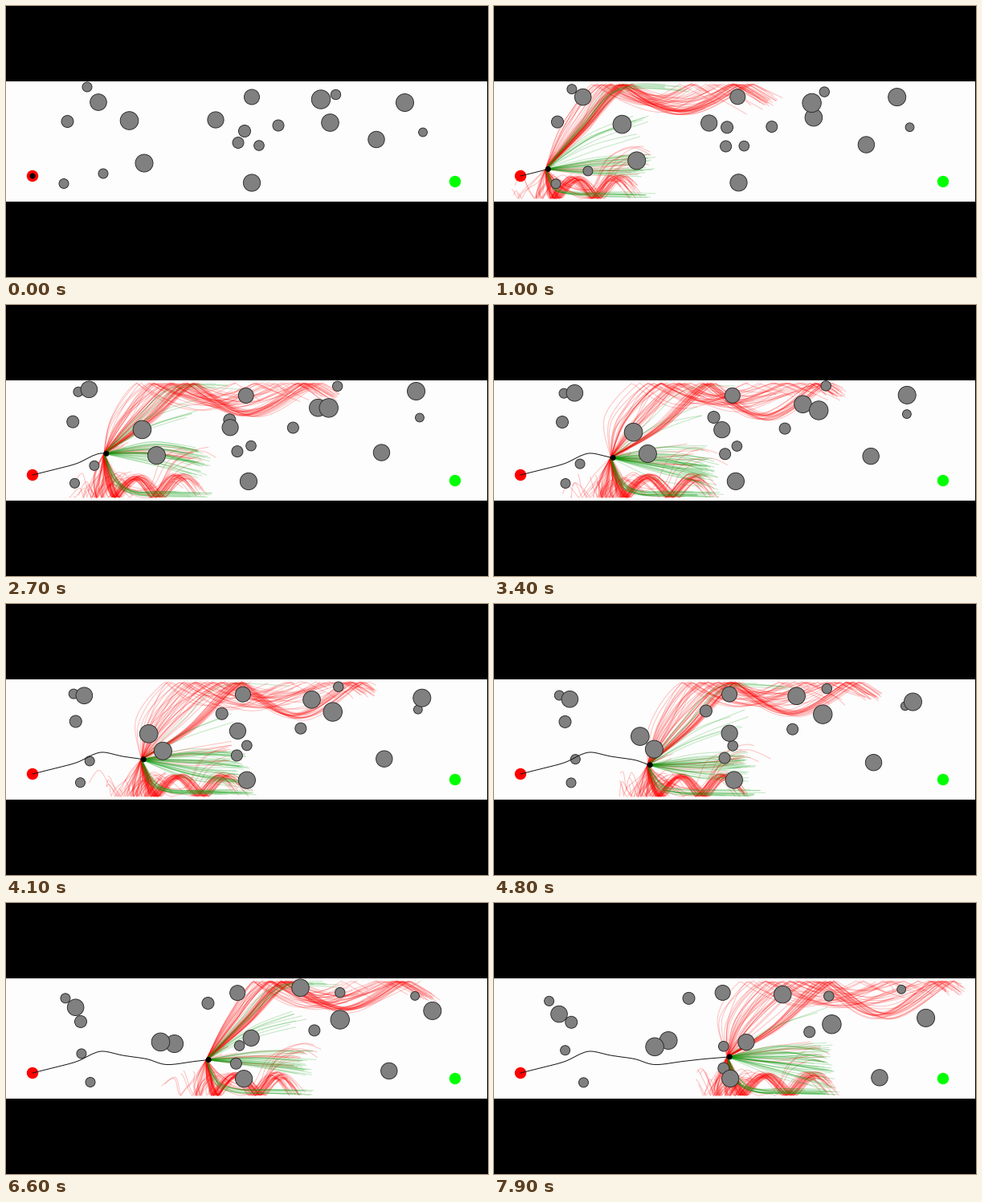
A matplotlib script for the animation above (8000 ms loop, 600 by 338 pixels).

```python
import matplotlib.pyplot as plt
import numpy as np
from matplotlib.animation import FuncAnimation
from matplotlib.collections import LineCollection
from matplotlib.patches import Circle, Rectangle

W, H, DPI = 600, 338, 100
FRAMES, STEP = 80, 100
PX = 72 / DPI
TOP, FLOOR = 97, 240.5
START, GOAL = (33, 212), (559, 219)
RED, GREEN = (1, 0, 0), (0.02, 0.62, 0.04)

# Each obstacle drifts in a straight line: start, radius, speed per second
OBSTACLES = [
    ((101, 101), 6, (-4.1, 2.7)), ((115, 120), 10.3, (-4.3, -6.4)),
    ((76.5, 144), 7.5, (2.5, 0.6)), ((153.5, 143), 11.3, (5.9, 4.6)),
    ((172, 196), 11, (5.7, -3.1)), ((121, 209), 6, (-4.1, -3.2)),
    ((72, 221.5), 6, (5, 0.3)), ((261, 142), 10.1, (6.7, 4)),
    ((306, 113.5), 9.5, (-2.7, -0.2)), ((297, 156), 7.5, (-6.9, -4.7)),
    ((289, 170.5), 7, (-0.4, 4.5)), ((315, 174), 6.3, (-3.7, 0.6)),
    ((339, 149), 7, (6.8, 1.5)), ((306, 220.5), 10.6, (-1.5, -0.2)),
    ((392, 116.5), 11.7, (3.6, 4.4)), ((403.5, 145.5), 10.8, (-5.6, -6.4)),
    ((410.5, 110.5), 6.2, (0.8, -3.4)), ((496.5, 120.5), 11, (5.2, -6.9)),
    ((519, 157.5), 5.4, (-1.5, -6.3)), ((461, 166.5), 10.2, (2.4, 6.5)),
]
OBSTACLES.sort(key=lambda o: o[1])

# Bends of the route the agent takes
ROUTE = np.array([START, (60, 205.3), (88, 197.7), (108, 188), (122, 185),
                  (145, 190), (175, 194.5), (200, 201.5), (235, 197.5),
                  (262, 194.5), (296, 191.7)])


def spline(points, n=64):
    """Catmull-Rom through points along the second last axis."""
    m = points.shape[-2]
    u = np.linspace(0, m - 1, n)
    i = np.minimum(u.astype(int), m - 2)
    f = (u - i)[:, None]
    weights = ((-f + 2 * f**2 - f**3) / 2, (2 - 5 * f**2 + 3 * f**3) / 2,
               (f + 4 * f**2 - 3 * f**3) / 2, (f**3 - f**2) / 2)
    eye = np.eye(m)
    basis = sum(w * eye[np.clip(i + k - 1, 0, m - 1)]
                for k, w in enumerate(weights))
    return basis @ points


def fold(y):
    """Reflect heights at the two walls."""
    y = TOP + np.abs(y - TOP)
    return FLOOR - np.abs(FLOOR - y)


def bundle(rng, n, points, wide, high, cut=0.85):
    """n noisy variants of one planned path that fan out along the way."""
    n, m = int(round(n)), len(points)
    ramp = np.sqrt(np.linspace(0, 1, m))[:, None]
    noise = (rng.uniform(-1, 1, (n, 1, 2))
             + 0.15 * rng.normal(size=(n, m, 2)))
    curves = spline(np.array(points) + ramp * noise * (wide, high))
    curves[..., 1] = fold(curves[..., 1])
    curves[..., 0] = np.maximum(curves[..., 0], 2)
    ends = (curves.shape[1] * rng.uniform(cut, 1, n)).astype(int)
    return [c[:e] for c, e in zip(curves, ends)]


def plans(t, x, y, rng):
    # The planner swings between steep, open routes (0) and blocked ones (1)
    blocked = 0.5 - 0.5 * np.cos(2 * np.pi * (t - 1.6) / 4.3)

    def mix(free, tight):
        return free + (tight - free) * blocked

    x -= 3
    rise, low = (y + TOP) / 2, (y + FLOOR) / 2

    def over_top(hit, land, end, sag, bow=0, bend=0):
        """Climb to the upper wall, sag below it, bounce once more."""
        return [(x, y), (x + hit / 2 + bow, rise + bend), (x + hit, TOP),
                (x + (hit + land) / 2, TOP - sag), (x + land, TOP),
                (x + end, TOP + mix(28, 14))]

    def hops(first, width, height, count):
        """Drop to the floor, then hop along it."""
        half = np.arange(2 * count + 1)
        tail = FLOOR + height * np.sin(half * np.pi / 2)
        return [(x, y), (x + first * 0.35, low),
                *zip(x + first + half * width / 2, tail)]

    red = (
        bundle(rng, 20, over_top(mix(92, 122), mix(238, 265), 284,
                                 mix(34, 44), bend=mix(0, 10)), 12, 5, 0.93)
        + bundle(rng, 34, over_top(mix(84, 68), mix(220, 210), mix(268, 245),
                                   mix(26, 24), bow=mix(0, -14)),
                 mix(32, 62), 14, 0.65)
        + bundle(rng, 34, hops(mix(11, 19), mix(49, 57), 26, 2), 10, 5)
        + bundle(rng, mix(12, 38), hops(mix(2, -2), 46, 24, 1),
                 mix(20, 26), 9, 0.55)
        + bundle(rng, mix(4, 9), hops(-22, -20, 22, 1), 22, 16, 0.65)
        + bundle(rng, mix(3, 14), [(x, y), (x + 14, y - 8), (x + 28, y - 16)],
                 14, 10, 0.5)
        + bundle(rng, 8, [(x, y), (x + 55, y - 2), (x + 118, mix(198, 184))],
                 10, 14)
        + bundle(rng, mix(11, 3), [(x, y), (x + 22, 226), (x + 60, 234),
                                   (x + 82, 200), (x + 112, 186),
                                   (x + 140, 195)], 14, 12, 0.75)
    )
    green = (
        bundle(rng, mix(20, 46), [(x, y), (x + 65, y + mix(-4, 6)),
                                  (x + 130, mix(195, 207))],
               8, mix(12, 27))
        + bundle(rng, mix(10, 0), [(x, y), (x + 46, rise), (x + 94, 104),
                                   (x + 178, 103)], 10, 4)
        + bundle(rng, mix(10, 2), [(x, y), (x + 55, y - 34),
                                   (x + 120, y - 56)], 8, 14)
        + bundle(rng, mix(10, 16), [(x, y), (x + 14, low + 6), (x + 38, 234),
                                    (x + 80, 235), (x + 138, 236)], 12, 4)
    )
    return red, green


fig = plt.figure(figsize=(W / DPI, H / DPI), dpi=DPI, facecolor="black")
ax = fig.add_axes([0, 0, 1, 1])
ax.set(xlim=(0, W), ylim=(H, 0))
ax.axis("off")
ax.add_patch(Rectangle((0, 93.8), W - 0.7, 150.2, fc="#fdfdfd", ec="none"))
for spot, color in ((GOAL, (0, 1, 0)), (START, RED)):
    ax.add_patch(Circle(spot, 7.2, fc=color, ec="none", zorder=2))

red_lines = LineCollection([], colors=[RED + (0.22,)],
                           linewidths=1.1 * PX, zorder=3)
green_lines = LineCollection([], colors=[GREEN + (0.22,)],
                             linewidths=1.1 * PX, zorder=4)
ax.add_collection(red_lines)
ax.add_collection(green_lines)
balls = [ax.add_patch(Circle(spot, r, fc="#808080", ec="#282828",
                             lw=0.9 * PX, zorder=5))
         for spot, r, _ in OBSTACLES]
trail, = ax.plot([], [], color="#181818", lw=PX, zorder=6)
agent = ax.add_patch(Circle(START, 3.5, fc="black", ec="none", zorder=7))

route = spline(ROUTE, 400)


def draw(frame):
    t = frame * STEP / 1000
    for ball, ((x, y), r, (vx, vy)) in zip(balls, OBSTACLES):
        wall = 93.7 + r
        ball.center = x + vx * t, wall + abs(y + vy * t - wall)

    x = START[0] + 34.6 * t - 0.21 * t**2
    y = np.interp(x, *route.T)
    done = route[route[:, 0] < x]
    trail.set_data(np.append(done[:, 0], x), np.append(done[:, 1], y))
    agent.center = x, y

    red, green = [], []
    if frame:
        red, green = plans(t, x, y, np.random.default_rng(frame))
    red_lines.set_segments(red)
    green_lines.set_segments(green)
    return [red_lines, green_lines, *balls, trail, agent]


anim = FuncAnimation(fig, draw, frames=FRAMES, interval=STEP,
                     repeat=True, repeat_delay=0)
plt.show()
```
